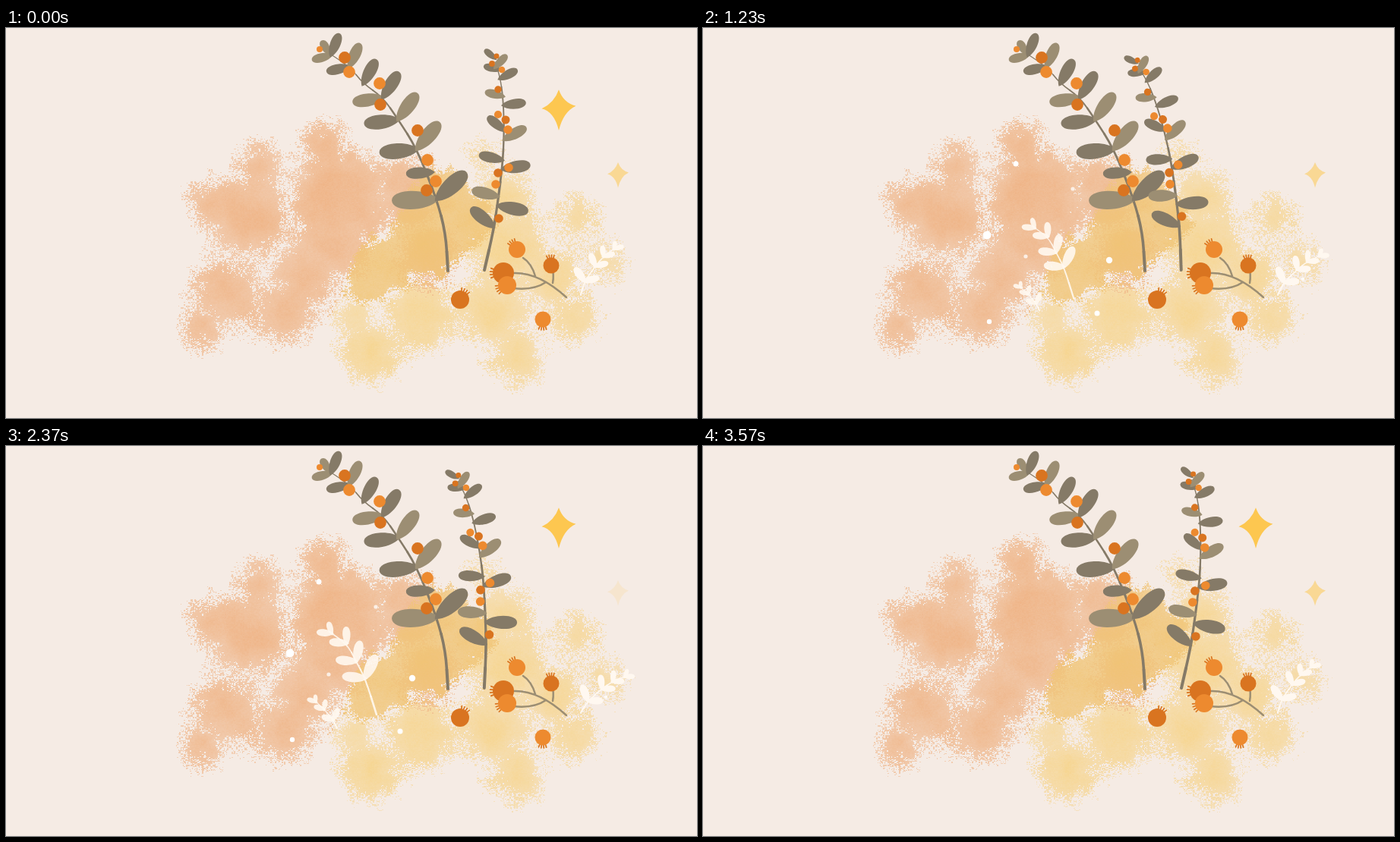
Write an HTML page with a canvas that moves like this. It is 910 by 514 pixels and loops after 3.6 s.

```html
<!DOCTYPE html>
<html lang="en">
<head>
<meta charset="utf-8">
<title>Autumn sprigs</title>
<style>
  html, body { margin: 0; width: 100%; height: 100%; overflow: hidden; background: #f5ebe4; }
  canvas { display: block; }
</style>
</head>
<body>
<canvas id="stage" width="910" height="514"></canvas>
<script>
const W = 910, H = 514, LOOP = 3600, STEP = 30;
const LEAF = { D: '#857a67', L: '#9c8e73', W: '#fff8f0' };
const BERRY = { D: '#d97420', L: '#ed8a2f' };
const ctx = document.getElementById('stage').getContext('2d');
const clamp = v => Math.min(1, Math.max(0, v));
const ramp = (t, from, to) => clamp((t - from) / (to - from));
const rad = degrees => degrees * Math.PI / 180;

function newLayer() {
  const layer = document.createElement('canvas');
  layer.width = W;
  layer.height = H;
  return layer;
}

// ---------- grainy paint washes ----------
function hash(x, y) {
  let n = Math.imul(x, 374761393) + Math.imul(y, 668265263);
  n = Math.imul(n ^ n >>> 13, 1274126177);
  return ((n ^ n >>> 16) >>> 0) / 2 ** 32;
}

function noise(x, y) {
  const i = Math.floor(x), j = Math.floor(y);
  const u = (x - i) ** 2 * (3 - 2 * (x - i)), v = (y - j) ** 2 * (3 - 2 * (y - j));
  const top = hash(i, j) * (1 - u) + hash(i + 1, j) * u;
  const low = hash(i, j + 1) * (1 - u) + hash(i + 1, j + 1) * u;
  return top * (1 - v) + low * v;
}

// Smooth union of discs [x, y, radius]; paint thickens with depth and thins out into grain at the rim
function wash(g, [red, green, blue], thin, thick, soft, discs) {
  const layer = newLayer(), c = layer.getContext('2d');
  const image = c.createImageData(W, H), px = image.data;
  for (let y = 90; y < 500; y++) for (let x = 200; x < 840; x++) {
    let sum = 0;
    for (const [cx, cy, r] of discs) sum += Math.exp((r - Math.hypot(x - cx, y - cy)) / 7);
    const depth = 7 * Math.log(sum) + (noise(x / 13, y / 13) - .5) * 16;
    const grain = hash(Math.floor(x / 1.5), Math.floor(y / 1.3)) * .7 + noise(x / 3, y / 2.5) * .3;
    if (ramp(depth, -soft, soft) < grain) continue;
    const tone = ramp(depth, -10, 38) * .65 + noise(x / 32, y / 32) * .35;
    const alpha = thin + (thick - thin) * tone + (grain - .5) * .12;
    px.set([red, green, blue, 255 * clamp(alpha)], (y * W + x) * 4);
  }
  c.putImageData(image, 0, 0);
  g.drawImage(layer, 0, 0);
}

// ---------- plant parts ----------
function leaf(g, color, x, y, angle, length, width) {
  g.save();
  g.translate(x, y);
  g.rotate(rad(angle));
  g.beginPath();
  g.moveTo(-3, 0);
  g.bezierCurveTo(length * .2, -width * .68, length, -width * .68, length, 0);
  g.bezierCurveTo(length, width * .68, length * .2, width * .68, -3, 0);
  g.fillStyle = color;
  g.fill();
  g.restore();
}

function dot(g, color, x, y, r) {
  g.beginPath();
  g.arc(x, y, r, 0, 7);
  g.fillStyle = color;
  g.fill();
}

function line(g, color, width, path) {
  g.strokeStyle = color;
  g.lineWidth = width;
  g.lineCap = 'round';
  g.stroke(new Path2D(path));
}

// Smooth stem through points from tip to base, growing thicker
function stem(g, color, points, thin, thick) {
  let from = points[0];
  points.slice(1).forEach((p, i) => {
    const next = points[i + 2];
    const to = next ? [(p[0] + next[0]) / 2, (p[1] + next[1]) / 2] : p;
    line(g, color, thin + (thick - thin) * (i + 1) / (points.length - 1), `M${from}Q${p} ${to}`);
    from = to;
  });
}

// One letter per node gives the leaf colour; lower case is a small leaf, a dot is none
function leaves(g, nodes, shades, shift, shape) {
  [...shades].forEach((shade, i) => {
    if (shade === '.') return;
    const [angle, length] = shape(i), key = shade.toUpperCase();
    const size = length * (shade === key ? 1 : .65);
    leaf(g, LEAF[key], nodes[i][0], nodes[i][1] + shift, angle, size, 2 + size * .37);
  });
}

function berries(g, shades, points, radius) {
  points.forEach(([x, y], i) => dot(g, BERRY[shades[i]], x, y, radius(i)));
}

// White sprig with a pair of leaves at every node above its base
function sprig(g, nodes, size, lean, mirror) {
  const shades = 'W'.repeat(nodes.length - 1);
  const turn = a => mirror ? 180 - a - lean : a + lean;
  stem(g, LEAF.W, nodes, 1.2, 1.6 + size);
  leaves(g, nodes, shades, 0, i => [turn(14 * i - 107), (16 + 6 * i) * size]);
  leaves(g, nodes, shades, 0, i => [turn(185), (20 + 3.5 * i) * size]);
}

// A berry with a fan of short sepals pointing along angle
function fruit(g, shade, x, y, r, angle) {
  for (let k = -1.5; k < 2; k++) {
    const a = rad(angle) + k * .25, c = Math.cos(a), s = Math.sin(a);
    line(g, BERRY.D, 1.7, `M${x} ${y}L${x + c * (r + 3.5)} ${y + s * (r + 3.5)}`);
  }
  dot(g, BERRY[shade], x, y, r);
}

// Four-pointed star with a longer lower ray
function star(g, x, y, r, alpha) {
  const up = r * 1.03, down = r * 1.36, c = r * .26;
  g.globalAlpha = alpha;
  g.fillStyle = '#fdc750';
  g.fill(new Path2D(`M${x} ${y - up}Q${x + c} ${y - c} ${x + r} ${y - r * .08}Q${x + c} ${y + c} ${x} ${y + down}
    Q${x - c} ${y + c} ${x - r} ${y + r * .08}Q${x - c} ${y - c} ${x} ${y - up}`));
  g.globalAlpha = 1;
}

// Draw with a turn and a scale about a fixed point
function posed(x, y, degrees, size, draw) {
  ctx.save();
  ctx.translate(x, y);
  ctx.rotate(rad(degrees));
  ctx.scale(size, size);
  ctx.translate(-x, -y);
  draw(ctx);
  ctx.restore();
}

// ---------- still picture ----------
function paintStill(g) {
  g.fillStyle = '#f5ebe4';
  g.fillRect(0, 0, W, H);

  wash(g, [246, 207, 122], .34, .76, 19,
    [[626, 168, 13], [655, 225, 38], [660, 290, 52], [750, 249, 25], [788, 310, 22], [748, 382, 28],
     [715, 330, 40], [640, 370, 46], [545, 380, 46], [480, 425, 38], [670, 434, 34], [460, 375, 22]]);
  wash(g, [238, 175, 126], .46, .88, 18,
    [[421, 153, 28], [336, 178, 26], [268, 230, 26], [318, 248, 54], [440, 225, 66], [530, 218, 46],
     [430, 285, 48], [555, 300, 36], [290, 348, 44], [365, 375, 40], [260, 390, 28], [395, 325, 44]]);
  wash(g, [240, 196, 117], .66, .92, 8,
    [[575, 233, 46], [555, 280, 48], [495, 315, 38], [610, 250, 30], [465, 342, 20]]);

  const nodes = [[428, 35], [452, 50], [470, 73], [496, 91], [516, 120], [541, 159], [562, 189], [567, 225]];
  stem(g, LEAF.D, [...nodes.filter((_, i) => i !== 6), [579, 270], [582, 320]], .8, 4);
  leaf(g, LEAF.L, 425, 33, 240, 19, 11);
  leaves(g, nodes, 'LD.LDDdL', 1, i => [166 + 1.8 * i, 26 + 4.7 * i]);
  leaves(g, nodes, 'DLDDLL.D', 1, i => [3.8 * i - 69, 31 + 3.2 * i]);
  berries(g, 'LDLLDDLLD',
    [[413, 28], [446, 39], [452, 58], [492, 73], [493, 101], [542, 135], [555, 174], [566, 202], [554, 214]],
    i => i ? 7.9 : 4);

  line(g, LEAF.L, 2.5, 'M669 323Q702 322 738 355M711 335Q695 346 668 343M697 327Q692 310 681 303M720 336Q722 325 719 315');
  fruit(g, 'L', 673, 292, 11, 235);
  fruit(g, 'D', 655, 323, 14, 180);
  fruit(g, 'L', 660, 339, 12, 155);
  fruit(g, 'D', 718, 313, 10.5, 265);
  fruit(g, 'D', 598, 358, 12, 300);
  fruit(g, 'L', 707, 384, 10.5, 92);
}

// ---------- moving parts ----------
function swayingStem(g) {
  const nodes = [[644, 45], [650, 60], [655, 95], [656, 140], [654, 179], [648, 227], [642, 267]];
  stem(g, LEAF.D, [...nodes, [630, 319]], 1, 4);
  leaves(g, nodes, 'DDLDDLD', -5, i => [202 + 18 * Math.cos(2.1 * i), 18 + 3.5 * i]);
  leaves(g, nodes, 'LDDLDD', 7, i => [6 * i - 47 + 14 * (i % 3), 23 + 3.5 * i]);
  berries(g, 'DDLDLDLLDLD',
    [[646, 37], [640, 47], [653, 55], [648, 81], [648, 114], [658, 121], [661, 134], [662, 184],
     [648, 191], [645, 206], [649, 251]], i => Math.min(5.8, 3.5 + i * .4));
}

function swayingSprig(g) {
  sprig(g, [[801, 291], [787, 301], [776, 314], [762, 334], [757, 351]], .66, 10, true);
}

function growingSprigs(g) {
  sprig(g, [[429, 247], [449, 260], [461, 284], [473, 306], [488, 354]], 1, 0, false);
  sprig(g, [[408, 337], [419, 347], [431, 361], [436, 372]], .6, 12, false);
}

const snow = [[412, 179, 3.5], [487, 212, 2.6], [374, 273, 5.5], [425, 301, 2.6],
  [535, 306, 4.2], [519, 376, 3.5], [377, 387, 3.2], [790, 331, 2.4]];

// Steady climb to 1 at the peak time, then steady return
const swing = (t, peak) => Math.min(ramp(t, 0, peak), 1 - ramp(t, peak, 3580));

function draw(t) {
  ctx.drawImage(still, 0, 0);
  star(ctx, 728, 104.5, 22.5, 1 - ramp(t, 1100, 1170) + ramp(t, 1290, 1400));
  star(ctx, 806, 191.5, 14, .54 - .4 * ramp(t, 1500, 2300) + .4 * ramp(t, 2700, 3030));

  ctx.globalAlpha = .9 * (1 - ramp(t, 3240, 3540));
  posed(491, 375.5, 0, 1 - (1 - ramp(t, 0, 1600)) ** 1.4, growingSprigs);

  const glow = ramp(t, 60, 400) - ramp(t, 1500, 1850) + ramp(t, 1930, 2200) - ramp(t, 3270, 3510);
  for (const [x, y, r] of snow) {
    ctx.globalAlpha = glow * (r < 3 ? .75 : 1);
    dot(ctx, '#fff', x, y, r);
  }
  ctx.globalAlpha = 1;
  posed(757, 352, 18.2 * swing(t, 2060), 1, swayingSprig);
  posed(629.5, 320, -17.8 * swing(t, 1460), 1, swayingStem);
}

const still = newLayer();
paintStill(still.getContext('2d'));

function tick() {
  draw(Math.floor(performance.now() % LOOP / STEP) * STEP);
  requestAnimationFrame(tick);
}
tick();
</script>
</body>
</html>
```
